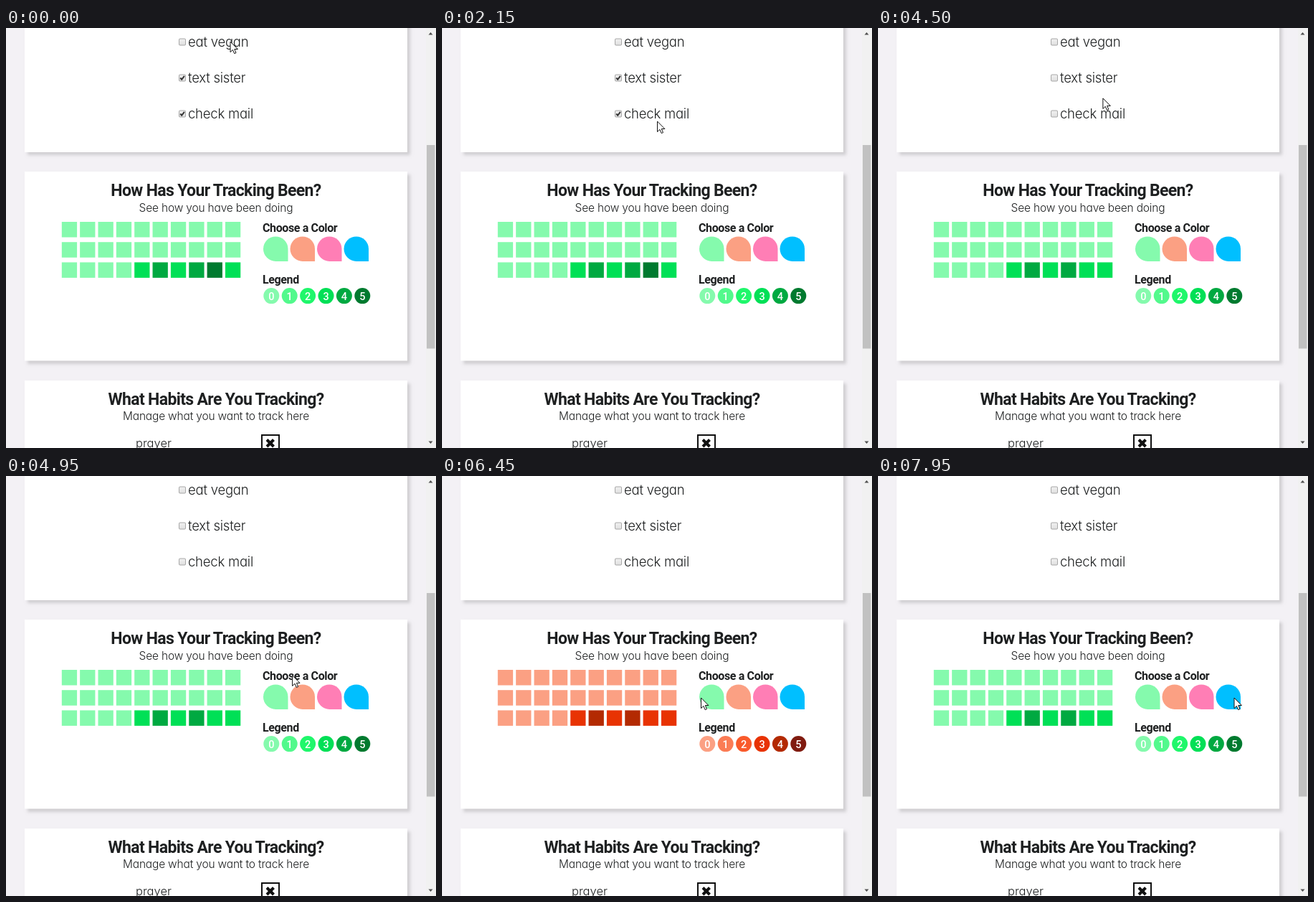
An HTML page with a canvas for the animation above (8 s loop, 600 by 585 pixels).

```html
<!DOCTYPE html>
<html lang="en">
<head>
<meta charset="utf-8">
<title>Habit tracker</title>
<style>
  html, body { margin: 0; width: 100%; height: 100%; overflow: hidden; background: #f3f1f5; }
  canvas, svg { position: absolute; left: 0; top: 0; width: 600px; height: 585px; }
  text { fill: #1e2021; font-family: Inter, Lato, sans-serif; font-weight: 300; font-feature-settings: "cv11"; white-space: pre; }
  .title { font: 700 23px Roboto, sans-serif; letter-spacing: -.65px; text-anchor: middle; }
  .head { font: 700 16px Roboto, sans-serif; letter-spacing: -.38px; }
  .sub { font-size: 15.5px; letter-spacing: -.18px; text-anchor: middle; }
  .item { font-size: 18.5px; letter-spacing: -.22px; }
  .habit { font-size: 16.5px; }
  .digit { font: 500 14.5px Roboto, sans-serif; fill: #fff; text-anchor: middle; }
</style>
</head>
<body>
<canvas id="stage" width="600" height="585"></canvas>
<svg viewBox="0 0 600 585">
  <g id="labels"></g>
  <text class="title" x="293" y="234">How Has Your Tracking Been?</text>
  <text class="sub" x="293" y="256">See how you have been doing</text>
  <text class="head" x="358" y="284">Choose a Color</text>
  <text class="head" x="358" y="356">Legend</text>
  <text class="title" x="293" y="524.5">What Habits Are You Tracking?</text>
  <text class="sub" x="293" y="546">Manage what you want to track here</text>
  <text class="habit" x="181" y="584">prayer</text>
  <path id="cursor" d="M0 0V14.6L3.4 11.4L5.7 16.6L8 15.6L5.8 10.5H10.4Z" fill="#fff" stroke="#111"/>
</svg>
<script>
const LOOP = 8000, STEP = 50;
const ITEM_Y = 19, ITEM_GAP = 50;
const ctx = document.getElementById('stage').getContext('2d');
const labels = document.getElementById('labels');
const cursor = document.getElementById('cursor');

const GREEN = ['#85faad', '#52f98c', '#1ff76b', '#00e056', '#00a941', '#007a2f'];
const CORAL = ['#fba083', '#fb7c55', '#f95a2b', '#e83303', '#b32a02', '#801b10'];
const SWATCHES = [GREEN[0], CORAL[0], '#ff7eb5', '#00bfff'];

// Times at which an item is cleared or a colour picked
const CLICK = { mail: 2950, sister: 4050, coral: 5700, green: 6700 };

// Pointer moves: start, end, x, y
const MOVES = [
  [0, 300, 311, 55],
  [1600, 2150, 300.5, 130],
  [2450, 2600, 302, 117],
  [3050, 3500, 298, 71],
  [4200, 4300, 302, 73],
  [4450, 5100, 414, 308],
  [5900, 6100, 361.5, 309],
  [6950, 7400, 497, 309]
];

function pointerAt(t) {
  let x = 313, y = 19;
  for (const [from, to, toX, toY] of MOVES) {
    const p = Math.min(1, Math.max(0, (t - from) / (to - from)));
    const k = 1 - (1 - p) ** 1.4;
    x += (toX - x) * k;
    y += (toY - y) * k;
  }
  return [x, y];
}

function addLabel(cls, x, y, content) {
  const label = document.createElementNS(labels.namespaceURI, 'text');
  label.setAttribute('class', cls);
  label.setAttribute('x', x);
  label.setAttribute('y', y);
  label.textContent = content;
  labels.append(label);
}

function rect(x, y, w, h, color) {
  ctx.fillStyle = color;
  ctx.fillRect(x, y, w, h);
}

function rounded(x, y, size, radii, color) {
  ctx.fillStyle = color;
  ctx.beginPath();
  ctx.roundRect(x, y, size, size, radii);
  ctx.fill();
}

function line(points, width, color) {
  ctx.strokeStyle = color;
  ctx.lineWidth = width;
  ctx.beginPath();
  points.forEach(([x, y]) => ctx.lineTo(x, y));
  ctx.stroke();
}

function triangle(x, y, dir) {
  ctx.fillStyle = '#505050';
  ctx.beginPath();
  ctx.moveTo(x - 3, y);
  ctx.lineTo(x + 3, y);
  ctx.lineTo(x, y + 3.5 * dir);
  ctx.fill();
}

function card(y, h) {
  ctx.save();
  ctx.shadowColor = 'rgba(0,0,0,.14)';
  ctx.shadowBlur = 4;
  ctx.shadowOffsetX = ctx.shadowOffsetY = 4;
  rect(26, y, 534, h, '#fff');
  ctx.restore();
}

function checkbox(index, checked) {
  const y = ITEM_Y + index * ITEM_GAP - 4.5;
  rounded(241, y, 10, 2, '#a8a8a8');
  const fill = ctx.createLinearGradient(0, y, 0, y + 10);
  fill.addColorStop(0, '#f2f2f2');
  fill.addColorStop(1, '#dedede');
  rounded(242, y + 1, 8, 1, fill);
  if (checked) line([[243.2, y + 5], [245.2, y + 7.2], [248.9, y + 2.4]], 1.9, '#333');
}

function scrollbar() {
  rect(586, 0, 14, 585, '#f1f1f1');
  rect(587, 163, 11.5, 283.5, '#c1c1c1');
  triangle(592.5, 9.5, -1);
  triangle(592.5, 575.5, 1);
}

function tracker(palette, level) {
  const recent = [0, 0, 0, 0, 3, 4, 3, 4, level, 3];
  for (let row = 0; row < 3; row++) {
    recent.forEach((shade, col) =>
      rect(77.8 + col * 25.35, 270 + row * 28.2, 21.3, 21.5, palette[row === 2 ? shade : 0]));
  }
  SWATCHES.forEach((color, i) =>
    rounded(359 + i * 37.5, 290.4, 34.5, [17.25, 17.25, 0, 17.25], color));
  palette.forEach((color, i) => rounded(359.3 + i * 25.4, 362.1, 22, 11, color));
}

function deleteButton() {
  ctx.strokeStyle = '#111';
  ctx.lineWidth = 2;
  ctx.strokeRect(357, 567, 24, 24);
  line([[364, 573.5], [373.5, 583]], 4, '#111');
  line([[373.5, 573.5], [364, 583]], 4, '#111');
}

function draw(t) {
  rect(0, 0, 600, 585, '#f3f1f5');
  card(-20, 193);
  card(200, 263.5);
  card(491, 110);
  scrollbar();

  checkbox(0, false);
  checkbox(1, t < CLICK.sister);
  checkbox(2, t < CLICK.mail);

  const level = 3 + (t < CLICK.sister) + (t < CLICK.mail + 150);
  tracker(t >= CLICK.coral && t < CLICK.green ? CORAL : GREEN, level);
  deleteButton();

  const [x, y] = pointerAt(t);
  cursor.setAttribute('transform', `translate(${x} ${y})`);
}

['eat vegan', 'text sister', 'check mail'].forEach((name, i) =>
  addLabel('item', 254, ITEM_Y + 6.5 + i * ITEM_GAP, name));
GREEN.forEach((_, i) => addLabel('digit', 370.3 + i * 25.4, 379, i));

const start = performance.now();
function tick() {
  const t = Math.max(0, performance.now() - start) % LOOP;
  draw(Math.floor(t / STEP) * STEP);
  requestAnimationFrame(tick);
}
tick();
</script>
</body>
</html>
```
